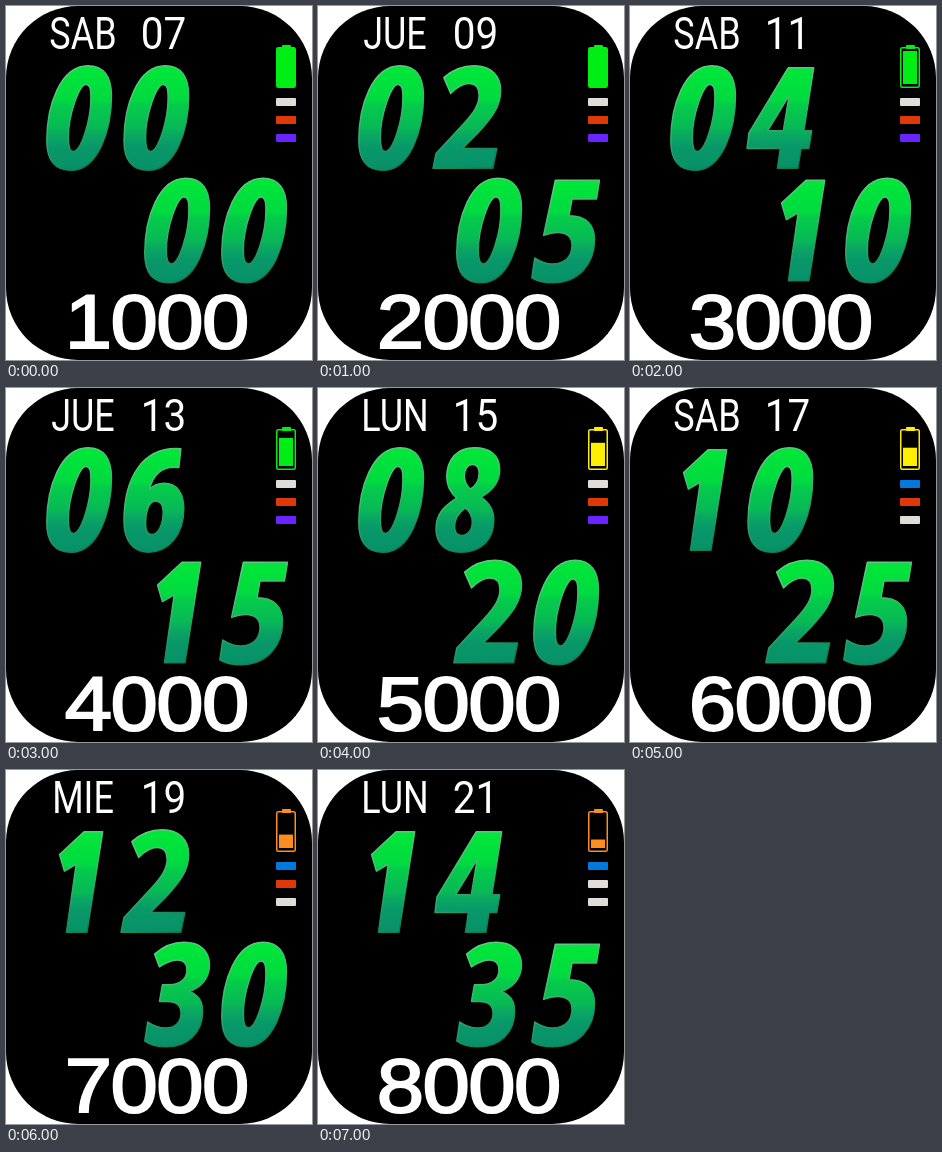
An HTML page for the animation above (8 s loop, 306 px wide and 354 px high).

```html
<!DOCTYPE html>
<html lang="es">
<head>
<meta charset="utf-8">
<title>Watch face</title>
<style>
html, body { margin: 0; width: 100%; height: 100%; overflow: hidden; background: #fff; }
svg { display: block; width: 306px; height: 354px; }
.date { font: 400 45px Roboto, "Noto Sans", sans-serif; fill: #fff; text-anchor: middle; }
.steps { font: 400 76px "Liberation Sans", Arial, sans-serif; letter-spacing: -1.4px; fill: #fff; stroke: #fff; stroke-width: 2; }
.digit { fill: url(#green); stroke: url(#edge); stroke-width: 1.5; stroke-linejoin: round; fill-rule: evenodd; }
</style>
</head>
<body>
<svg viewBox="0 0 306 354">
  <defs>
    <linearGradient id="green" gradientUnits="userSpaceOnUse" x1="0" y1="0" x2="0" y2="106">
      <stop offset="0" stop-color="#00e838"/>
      <stop offset=".33" stop-color="#00da40"/>
      <stop offset=".37" stop-color="#04cc4a"/>
      <stop offset=".6" stop-color="#08b856"/>
      <stop offset=".66" stop-color="#0aa862"/>
      <stop offset=".78" stop-color="#08986a"/>
      <stop offset="1" stop-color="#089068"/>
    </linearGradient>
    <linearGradient id="edge" gradientUnits="userSpaceOnUse" x1="0" y1="0" x2="50" y2="106">
      <stop offset="0" stop-color="#6cd088"/>
      <stop offset=".5" stop-color="#3cb46c"/>
      <stop offset="1" stop-color="#0a7654"/>
    </linearGradient>
  </defs>
  <rect width="306" height="354" rx="72"/>
  <text id="day" class="date" transform="translate(77 42.5) scale(.8 1)"></text>
  <text id="date" class="date" transform="translate(157.5 42.5) scale(.9 1)"></text>
  <g class="digit">
    <path id="h1" transform="translate(40.8 59.8) scale(.98 .985)"/>
    <path id="h0" transform="translate(118 59.8) scale(.98 .985)"/>
    <path id="m1" transform="translate(138.8 172.3) scale(.98 .985)"/>
    <path id="m0" transform="translate(215.8 172.3) scale(.98 .985)"/>
  </g>
  <g id="battery">
    <rect x="276" y="39" width="9" height="4" rx="1"/>
    <rect x="270.75" y="41.75" width="18.5" height="39.5" rx="1.5" fill="none" stroke="currentColor" stroke-width="1.5"/>
    <rect id="level"/>
  </g>
  <rect id="bar0" x="270" y="92" width="20" height="8" rx="1"/>
  <rect id="bar1" x="270" y="110" width="20" height="8" rx="1"/>
  <rect id="bar2" x="270" y="128" width="20" height="8" rx="1"/>
  <text id="steps" class="steps" transform="translate(58.8 342.2) scale(1.12 1)"></text>
</svg>
<script>
const STEP = 1000, COUNT = 8;
const $ = id => document.getElementById(id);

// Slanted numerals in a box of 66 by 106
const glyphs = {
  0: "M42 0C58 0 66 11 66 30C66 66 52 106 25 106C8 106 0 95 0 76C0 40 14 0 42 0Z" +
     "M40 19C33 19 22 50 22 73C22 82 23 87 27 87C35 87 45 55 45 33C45 23 44 19 40 19Z",
  1: "M38 2H57L41 104H20L30 35L18 42L13 25Z",
  2: "M-3 104L0 89L28 59C38 48 44 40 44 30C44 22 40 18 34 18C27 18 21 22 15 28L8 12" +
     "C17 4 27 0 39 0C56 0 66 10 66 25C66 42 56 54 43 68L27 84H62L58 104Z",
  3: "M10 12C19 4 29 0 40 0C57 0 66 9 66 23C66 37 57 46 45 50C55 53 59 60 59 70" +
     "C59 92 44 106 22 106C13 106 5 104 0 100L3 81C9 85 15 87 21 87C31 87 37 81 37 72" +
     "C37 64 32 60 23 60H15L18 43H25C36 43 43 37 43 28C43 21 39 18 33 18C27 18 21 21 15 25Z",
  4: "M41 2H67L57 66H65L62 84H54L51 104H30L33 84H-1L1 68ZM36 66L42 30L20 66Z",
  5: "M22 2H67L64 21H39L36 38C53 38 62 47 62 62C62 88 45 106 19 106C10 106 3 104 -2 101" +
     "L1 81C7 85 13 87 19 87C32 87 39 79 39 68C39 59 33 55 24 55C19 55 15 56 10 58Z",
  6: "M58 1L56 20C40 18 30 26 26 42C30 38 35 36 41 36C54 36 61 46 61 62C61 88 46 106 25 106" +
     "C9 106 0 94 0 74C0 32 18 -2 58 1Z" +
     "M32 54C25 54 22 66 22 76C22 84 24 88 28 88C36 88 40 76 40 65C40 58 38 54 32 54Z",
  8: "M39 0C56 0 65 8 65 22C65 36 57 44 46 50C55 56 59 63 59 73C59 94 46 106 25 106" +
     "C9 106 0 97 0 82C0 66 10 58 21 51C14 45 11 38 11 30C11 11 22 0 39 0Z" +
     "M37 17C32 17 29 22 29 29C29 35 32 39 35 42C41 38 44 33 44 26C44 20 41 17 37 17Z" +
     "M30 61C23 66 19 72 19 80C19 86 22 89 26 89C33 89 37 83 37 75C37 69 35 65 30 61Z"
};

const days = ["DOM", "LUN", "MAR", "MIE", "JUE", "VIE", "SAB"];
const green = "#00ee14", yellow = "#ffee00", orange = "#ff8c1e";
const white = "#e0dcd8", red = "#e03808", purple = "#6a24ff", blue = "#0078dc";

const pad = n => String(n).padStart(2, "0");

function set(id, attrs) {
  for (const key in attrs) $(id).setAttribute(key, attrs[key]);
}

function setPair(name, n) {
  const [tens, ones] = pad(n);
  set(name + "1", { d: glyphs[tens] });
  set(name + "0", { d: glyphs[ones] });
}

function setBattery(i) {
  const color = i < 4 ? green : i < 6 ? yellow : orange;
  const full = i < 2;
  const inset = full ? 1 : 3;
  const top = full ? 42 : 45 + (i - 2) * 4.9;
  const bottom = full ? 81 : 78;
  set("battery", { fill: color, color });
  set("level", { x: 270 + inset, y: top, width: 20 - 2 * inset, height: bottom - top });
}

function setBars(i) {
  const colors = i < 5 ? [white, red, purple] : [blue, i < 7 ? red : white, white];
  colors.forEach((fill, k) => set("bar" + k, { fill }));
}

// Each step moves on one month and two days
function show(i) {
  const when = new Date(Date.UTC(2023, i, 7 + 2 * i));
  $("day").textContent = days[when.getUTCDay()];
  $("date").textContent = pad(when.getUTCDate());
  setPair("h", 2 * i);
  setPair("m", 5 * i);
  setBattery(i);
  setBars(i);
  $("steps").textContent = 1000 * (i + 1);
}

let start = null, shown = -1;
function tick(now) {
  if (start === null) start = now;
  const i = Math.floor(Math.max(0, now - start) / STEP) % COUNT;
  if (i !== shown) show(shown = i);
  requestAnimationFrame(tick);
}
show(0);
requestAnimationFrame(tick);
</script>
</body>
</html>
```
